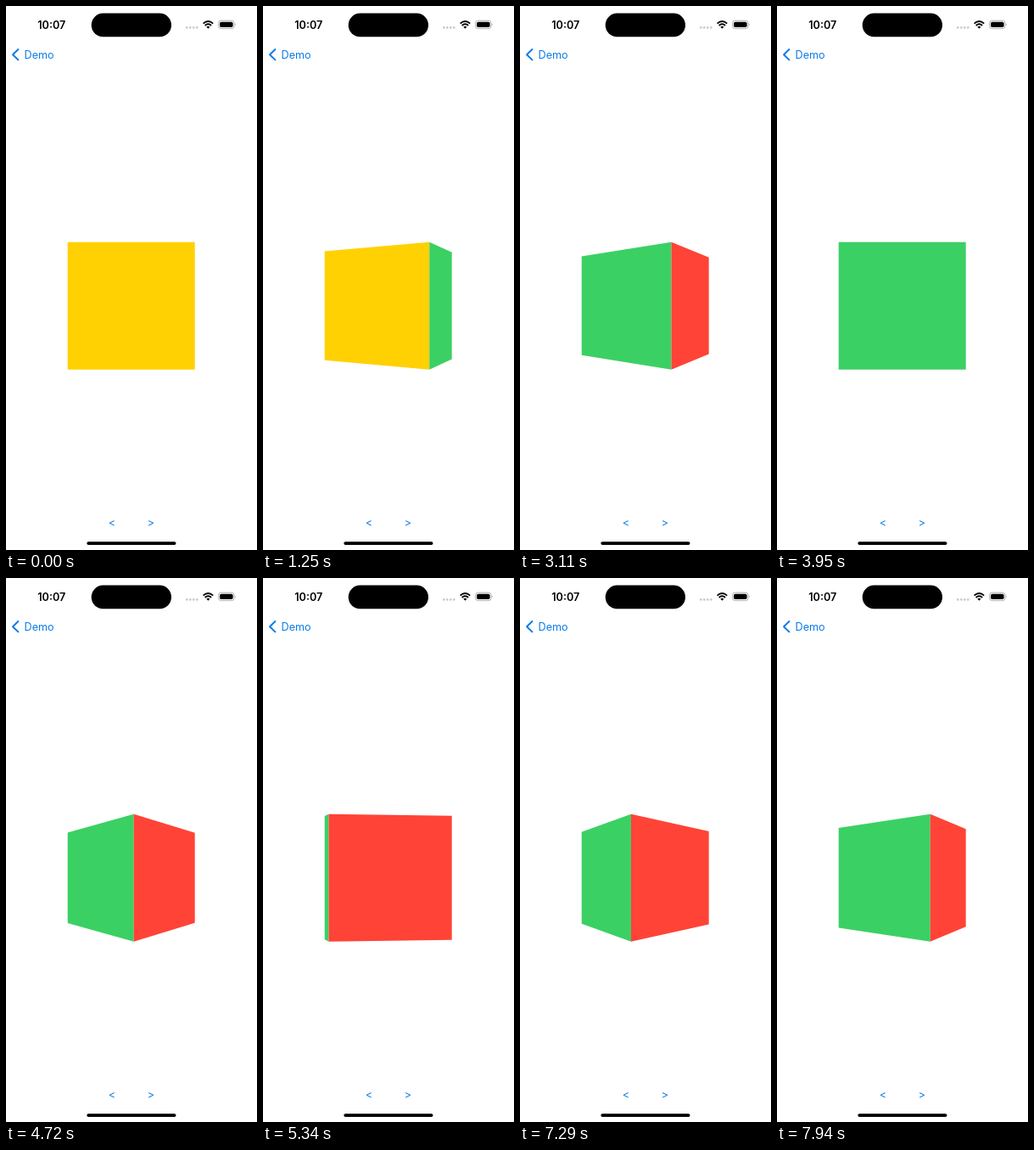
Write an HTML page that moves like this. It is 296 px wide and 640 px high and loops after 8000 ms.

```html
<!DOCTYPE html>
<html lang="en">
<head>
<meta charset="utf-8">
<title>Cube pager</title>
<style>
  html, body { margin: 0; width: 100%; height: 100%; overflow: hidden; background: #fff; }
  svg { display: block; width: 296px; height: 640px; }
  text { font-family: Inter, Roboto, sans-serif; }
  .tint { fill: #0a7be8; font-size: 12.6px; }
</style>
</head>
<body>
<svg viewBox="0 0 296 640">
  <text x="37.3" y="26.7" font-size="12.6" font-weight="600">10:07</text>
  <rect x="100.7" y="8.6" width="94.3" height="27.6" rx="13.8"/>
  <g fill="#c8c8ca">
    <circle cx="213.3" cy="25.4" r="1.3"/>
    <circle cx="217.3" cy="25.4" r="1.3"/>
    <circle cx="221.3" cy="25.4" r="1.3"/>
    <circle cx="225.3" cy="25.4" r="1.3"/>
  </g>
  <g fill="none" stroke="#000" stroke-width="1.8">
    <path d="M232.6 20.7 Q238.4 15.2 244.2 20.7"/>
    <path d="M234.7 23 Q238.4 19.5 242.1 23"/>
  </g>
  <path d="M236.4 24.6 Q238.4 22.9 240.4 24.6 L238.4 26.7 Z"/>
  <rect x="250.5" y="17.2" width="18.6" height="9.4" rx="3" fill="none" stroke="#a8a8a8" stroke-width=".9"/>
  <rect x="252" y="18.7" width="15.6" height="6.4" rx="1.8"/>
  <path d="M270 20.3 q1.4 1.6 0 3.2 z" fill="#a0a0a0"/>

  <path d="M14.4 51 L8 57.2 L14.4 63.4" fill="none" stroke="#0a7be8" stroke-width="1.9" stroke-linecap="round" stroke-linejoin="round"/>
  <text class="tint" x="21.6" y="61.6">Demo</text>

  <polygon id="left"/>
  <polygon id="right"/>

  <text class="tint" x="125" y="612.2" text-anchor="middle">&lt;</text>
  <text class="tint" x="170.8" y="612.2" text-anchor="middle">&gt;</text>
  <rect x="95.3" y="630.2" width="105.2" height="3.8" rx="1.9"/>
</svg>
<script>
  const LOOP = 8000;
  const SIZE = 150, LEFT = 72.7, TOP = 277.7;
  const COLORS = ['#ffd102', '#3bd064', '#ff4336'];

  // Each move: first step time, last step time, number of steps, page position reached.
  const MOVES = [
    [1140, 1580, 5, 0.51],
    [1870, 2170, 4, 1],
    [2680, 3220, 6, 1.393],
    [3610, 3950, 4, 1],
    [4490, 5040, 6, 1.96],
    [5340, 5340, 1, 1.968],
    [6040, 6490, 5, 2.287],
    [6750, 7520, 8, 1.31],
    [7640, 7640, 1, 1.295],
    [7940, 7940, 1, 1.28]
  ];

  const leftFace = document.getElementById('left');
  const rightFace = document.getElementById('right');
  const ease = x => (1 - Math.cos(Math.PI * x)) / 2;

  function positionAt(time) {
    let position = 0;
    for (const [start, end, steps, target] of MOVES) {
      if (time < start) break;
      const interval = (end - start) / (steps - 1) || 1;
      const step = Math.min(steps, Math.floor((time - start) / interval + 1e-6) + 1);
      position += (target - position) * ease(step / steps);
    }
    return position;
  }

  // A face narrows at its far side; the near side keeps full height.
  function drawFace(face, color, nearX, farX) {
    const share = Math.abs(farX - nearX) / SIZE;
    if (!color || share < 0.001) {
      face.setAttribute('points', '');
      return;
    }
    const shrink = (0.292 + 0.05 * (0.5 - share)) * Math.sin(Math.PI * share);
    const inset = shrink * SIZE / 2;
    const bottom = TOP + SIZE;
    face.setAttribute('fill', color);
    face.setAttribute('points',
      `${nearX},${TOP} ${farX},${TOP + inset} ${farX},${bottom - inset} ${nearX},${bottom}`);
  }

  function render(time) {
    const position = positionAt(time);
    const page = Math.floor(position);
    const edge = LEFT + SIZE * (1 - position + page);
    drawFace(leftFace, COLORS[page], edge, LEFT);
    drawFace(rightFace, COLORS[page + 1], edge, LEFT + SIZE);
  }

  function tick() {
    render(performance.now() % LOOP);
    requestAnimationFrame(tick);
  }
  tick();
</script>
</body>
</html>
```
